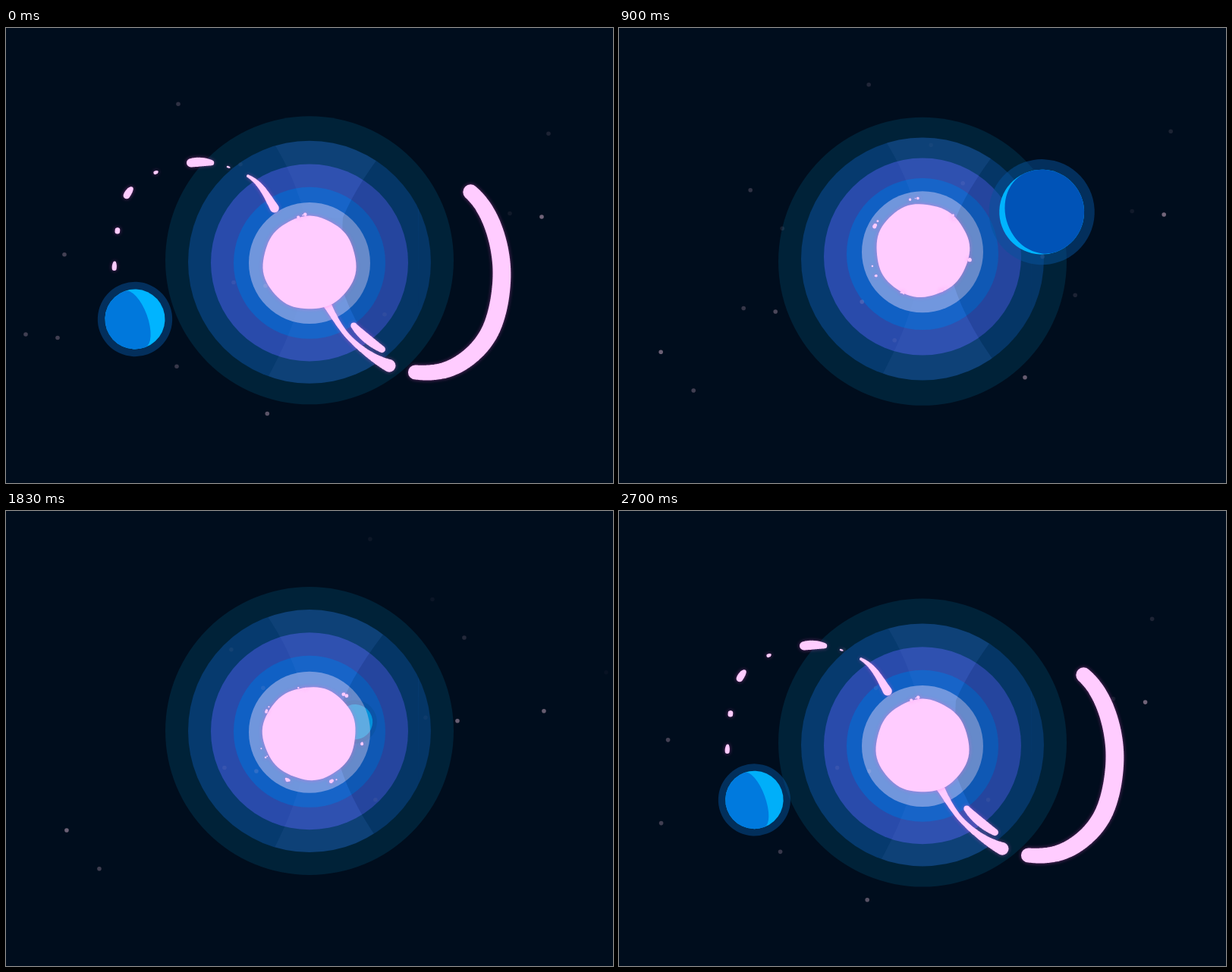
An HTML page with a canvas for the animation above (2.73 s loop, 800 px wide and 600 px high).

```html
<!DOCTYPE html>
<html lang="en">
<head>
<meta charset="utf-8">
<title>Star and planet</title>
<style>
  html, body { margin: 0; width: 100%; height: 100%; overflow: hidden; background: #000d1d; }
  canvas { display: block; width: 800px; height: 600px; }
</style>
</head>
<body>
<canvas id="stage" width="800" height="600"></canvas>
<script>
const ctx = document.getElementById('stage').getContext('2d');
const LOOP = 2730, HALF = LOOP / 2, STEP = 30, TAU = Math.PI * 2;

const mod = (a, n) => ((a % n) + n) % n;
const mix = (a, b, k) => a + (b - a) * k;
const ease = x => x < .5 ? 4 * x ** 3 : 1 - 4 * (1 - x) ** 3;
const rand = n => mod(Math.sin(n * 127.1 + 3.7) * 43758.5453, 1);

function disc(x, y, r, fill) {
  ctx.beginPath();
  ctx.arc(x, y, r, 0, TAU);
  ctx.fillStyle = fill;
  ctx.fill();
}

// Height of the star; the rings follow it with a delay.
function bob(t, delay) {
  const p = mod(t - delay, LOOP) / HALF;
  return p < 1 ? 310 - 20 * ease(p) : 290 + 20 * ease(p - 1);
}

// --- Stars drift on parallel tracks: height at x = 0, offset, alpha left and right, speed
const TRACKS = [
  [157, -82, .32, -.12, 1],
  [257, 0, .27, -.05, 1],
  [318, 42, .3, .1, 1],
  [410.5, -9, .28, .03, 1],
  [425.5, 33, .25, .5, 1],
  [441, 147, .45, .42, 1],
  [502.5, 190, .3, .06, 1],
  [594.5, 296, .28, .5, 1.38]
];
const GROUPS = [35, -203, -468, -832];

function drawStars(t) {
  for (const [y0, offset, left, right, speed] of TRACKS) {
    const edge = (y0 - 380) ** 2 / 250;
    for (const g of GROUPS) {
      const x = mod(g * speed + offset + .418 * speed * t, 1141 * speed);
      const y = y0 - x / 4;
      if (x < 22 + edge || x > 800 - edge) continue;
      const veil = Math.hypot(x - 400, y - 300) < 190 ? .4 : 1;
      const alpha = Math.max(0, mix(left, right, x / 800)) * veil;
      disc(x, y, 2.8, `rgba(240,200,225,${alpha})`);
    }
  }
}

// --- Rings: radius, delay, colour
const RINGS = [
  [190, 490, '#002238'],
  [160, 340, '#063a6e'],
  [130, 255, '#294bab'],
  [100, 170, '#1060c4']
];

function fillWedge(fill, a, b, c, d, e, f) {
  ctx.beginPath();
  ctx.moveTo(...a);
  ctx.quadraticCurveTo(...b, ...c);
  ctx.lineTo(...d);
  ctx.quadraticCurveTo(...e, ...f);
  ctx.fillStyle = fill;
  ctx.fill();
}

function drawShades(t) {
  const light = 'rgba(140,170,255,.06)', dark = 'rgba(0,13,30,.09)';
  const topRight = [[542, 110], [470, 188], [444, 250]];
  const lowRight = [[440, 335], [465, 415], [545, 500]];
  ctx.save();
  ctx.beginPath();
  ctx.arc(400, bob(t, 340), 160, 0, TAU);
  ctx.clip();
  fillWedge(light, [315, 100], [375, 170], [394, 250], ...[...topRight].reverse());
  fillWedge(light, [325, 495], [378, 410], [394, 335], ...lowRight);
  fillWedge(dark, ...topRight, ...lowRight);
  ctx.fillRect(544, 100, 60, 410);
  ctx.restore();
}

// --- Planet on a tilted orbit, seen edge on with perspective
function drawPlanet(t) {
  const turn = TAU * t / LOOP, z = Math.sin(turn), c = Math.cos(turn);
  const x = 396 - 226 * c * (1 + .51 * z + .05 * z * z);
  const y = 384 - .365 * (x - 170);
  const r = 39.5 + 18.7 * z;
  const shade = Math.max(-1, z + .42 * c * (1 - z));
  const dim = z > 0 ? 42 * z : 14 * z;
  ctx.save();
  ctx.globalAlpha = 1 + Math.max(-.25, .5 * Math.min(z, 0));
  ctx.translate(x, y);
  ctx.rotate(-.35);
  if (c < 0) ctx.scale(-1, 1);
  disc(0, 0, r * 1.245, 'rgba(6,82,156,.5)');
  disc(0, 0, r, '#00b4ff');
  ctx.beginPath();
  ctx.arc(0, 0, r, TAU / 4, TAU * .75);
  ctx.ellipse(0, 0, Math.abs(shade) * r, r, 0, -TAU / 4, TAU / 4, shade < 0);
  ctx.fillStyle = `rgb(0,${120 - dim},${220 - dim})`;
  ctx.fill();
  ctx.restore();
}

// --- Plumes: pieces of plasma sliding along smooth paths measured by length
function makePath(...pts) {
  const line = [];
  const spline = (a, b, c, d, k) =>
    .5 * (2 * b + (c - a) * k + (2 * a - 5 * b + 4 * c - d) * k * k + (3 * b - a - 3 * c + d) * k ** 3);
  const pick = i => pts[Math.min(pts.length - 1, Math.max(0, i))];
  let len = 0;
  for (let i = 0; i < pts.length - 1; i++) {
    for (let k = 0; k < 1; k += .0625) {
      const [x, y] = [0, 1].map(n => spline(...[-1, 0, 1, 2].map(j => pick(i + j)[n]), k));
      const last = line[line.length - 1];
      if (last) len += Math.hypot(x - last.x, y - last.y);
      line.push({ x, y, s: len });
    }
  }
  return {
    len,
    at(s, side) {
      const i = line.findIndex(p => p.s > s);
      const q = line[i < 0 ? line.length - 1 : i], p = line[(i < 0 ? line.length - 1 : i) - 1];
      const d = q.s - p.s, k = (s - p.s) / d;
      return [mix(p.x, q.x, k) + (q.y - p.y) / d * side, mix(p.y, q.y, k) - (q.x - p.x) / d * side];
    }
  };
}

// Ends and their speeds, radii at tail, middle and head, shift to the side
const piece = (tail, head, vTail, vHead, radii, side = 0) => ({ tail, head, vTail, vHead, radii, side });

const drops = (count, make) => Array.from({ length: count }, (_, i) => make(i));

const PLUMES = [
  {
    zero: 2460, lead: 410,
    path: makePath([385, 350], [305, 445], [212, 430], [152, 355], [144, 300],
      [165, 212], [250, 177], [322, 197], [357, 242], [375, 265]),
    pieces: [
      piece(250, 462, 1.85, 1.85, [2.5, 8.5, 6]),
      piece(216, 226, 1.55, 1.72, [2, 4, 6]),
      ...drops(6, i => {
        const s = 208 - 21 * i, v = 1.47 - .104 * i;
        const r = i % 2 ? 6.5 - .7 * i : 1.3 + .5 * i;
        return piece(s, s + 3, v, v + (i % 2 ? .09 / i : 0), [r, r, r * .6]);
      })
    ]
  },
  {
    zero: 0, lead: 400,
    path: makePath([410, 340], [452, 408], [515, 449], [585, 449], [638, 400], [653, 312],
      [625, 230], [555, 182], [492, 180], [438, 208], [420, 262]),
    pieces: [
      piece(181, 498, 1.6, 1.85, [9.5, 12, 10]),
      piece(0, 146, 1.58, 1.31, [9, 3.2, 8.5]),
      piece(72, 126, 1.6, 1.6, [4, 6, 4.5], 15),
      ...drops(3, i => piece(-56 - 48 * i, -56 - 48 * i, 1.58, 1.58, [3, 3, 3]))
    ]
  }
];

function drawPlumes(t) {
  ctx.beginPath();
  for (const { zero, lead, path, pieces } of PLUMES) {
    const age = mod(t - zero + lead, LOOP) - lead;
    for (const { tail, head, vTail, vHead, radii: [ra, rm, rb], side } of pieces) {
      const a = tail + vTail * age, b = Math.max(a, head + vHead * age);
      for (let s = Math.max(a, 0); s <= Math.min(b, path.len); s += 1.5) {
        const u = b > a ? (s - a) / (b - a) : 0;
        const r = mix(ra, rb, u) + (rm - (ra + rb) / 2) * 4 * u * (1 - u);
        const [x, y] = path.at(s, side);
        ctx.moveTo(x + r, y);
        ctx.arc(x, y, r, 0, TAU);
      }
    }
  }
  ctx.fill();
}

// --- Star body with small splashes at its edge
function drawSun(t, y) {
  const turn = TAU * t / LOOP;
  ctx.beginPath();
  for (let a = 0; a < TAU; a += .08) {
    const r = 61.3 + .6 * Math.sin(3 * a + turn) + .5 * Math.sin(7 * a - 2 * turn);
    ctx.lineTo(400 + r * Math.cos(a), y + r * Math.sin(a));
  }
  ctx.fill();
  ctx.beginPath();
  for (let i = 0; i < 21; i++) {
    const site = i % 7;
    const power = site ? Math.sqrt(Math.sin(turn / 2)) : .8;
    const life = mod(4 * t / LOOP + rand(site) + .12 * rand(i + 40), 1);
    const a = TAU * (site / 7 - .27 + .05 * (rand(i + 9) - .5));
    const r = 57 + 15 * power * Math.sin(Math.PI * life);
    const size = (1.2 + 2.6 * rand(i + 70)) * (1 - .5 * life) * power;
    const px = 400 + r * Math.cos(a), py = y + r * Math.sin(a);
    ctx.moveTo(px + size, py);
    ctx.arc(px, py, size, 0, TAU);
  }
  ctx.fill();
}

function draw(now) {
  const t = Math.floor(mod(now, LOOP) / STEP) * STEP;
  // Plasma is drawn on twos.
  const held = Math.floor(mod(t + STEP, LOOP) / (2 * STEP)) * 2 * STEP;
  const front = t <= HALF + STEP || t > LOOP - 3 * STEP;

  ctx.fillStyle = '#000d1d';
  ctx.fillRect(0, 0, 800, 600);
  for (const [r, delay, fill] of RINGS) disc(400, bob(t, delay), r, fill);
  drawStars(t);
  if (!front) drawPlanet(t);
  disc(400, bob(t, 85), 80, 'rgba(255,230,255,.4)');
  drawShades(t);

  ctx.save();
  ctx.fillStyle = '#ffccff';
  ctx.shadowColor = 'rgba(255,90,220,.45)';
  ctx.shadowBlur = 5;
  drawPlumes(held);
  drawSun(held, bob(t, 0));
  ctx.restore();
  if (front) drawPlanet(t);
}

const begin = performance.now();
function tick() {
  draw(performance.now() - begin);
  requestAnimationFrame(tick);
}
tick();
</script>
</body>
</html>
```
